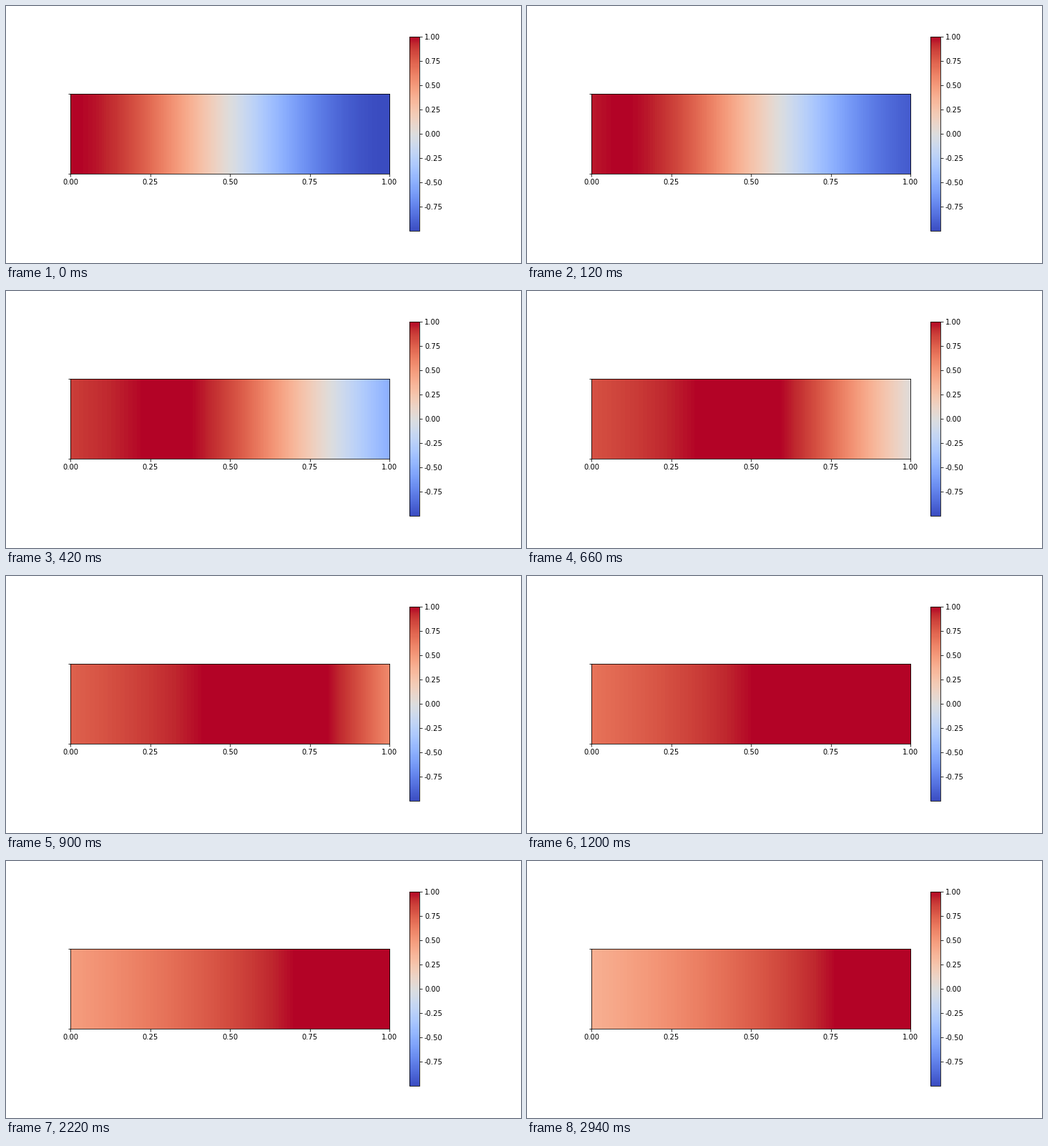
Recreate the animation shown at these times as a matplotlib script. Size 720x360 px, loop 3 s.

```python
import numpy as np
import matplotlib.pyplot as plt
from matplotlib.animation import FuncAnimation

FRAMES, DT = 50, 0.02
SPEED = 2.0
N = 446

plt.rcParams.update({"font.family": "DejaVu Sans", "font.size": 10})

x = (np.arange(N) + 0.5) / N


def solution(t):
    """u_t + 2 u_x = x + t, u(x, 0) = cos(pi x), u(0, t) = exp(-t)."""
    ahead = np.cos(np.pi * (x - SPEED * t)) + x * t - t**2 / 2
    behind = np.exp(x / SPEED - t) + x * t / 2 + x**2 / 8
    return np.where(x > SPEED * t, ahead, behind)[np.newaxis, :]


fig, ax = plt.subplots(figsize=(10, 5), dpi=72)
fig.subplots_adjust(left=0.125, right=0.9, bottom=0.125, top=0.88)

im = ax.imshow(solution(0), cmap="coolwarm", vmin=-0.9999, vmax=1,
               extent=(0, 1, 0, 0.25), interpolation="nearest")
ax.set_xticks(np.linspace(0, 1, 5))
ax.set_yticks([0, 0.25], labels=[])
fig.colorbar(im, ticks=np.linspace(-0.75, 1, 8), format="%.2f")


def update(i):
    im.set_data(solution(i * DT))
    return [im]


anim = FuncAnimation(fig, update, frames=FRAMES, interval=60,
                     repeat=True, repeat_delay=0)
plt.show()
```
